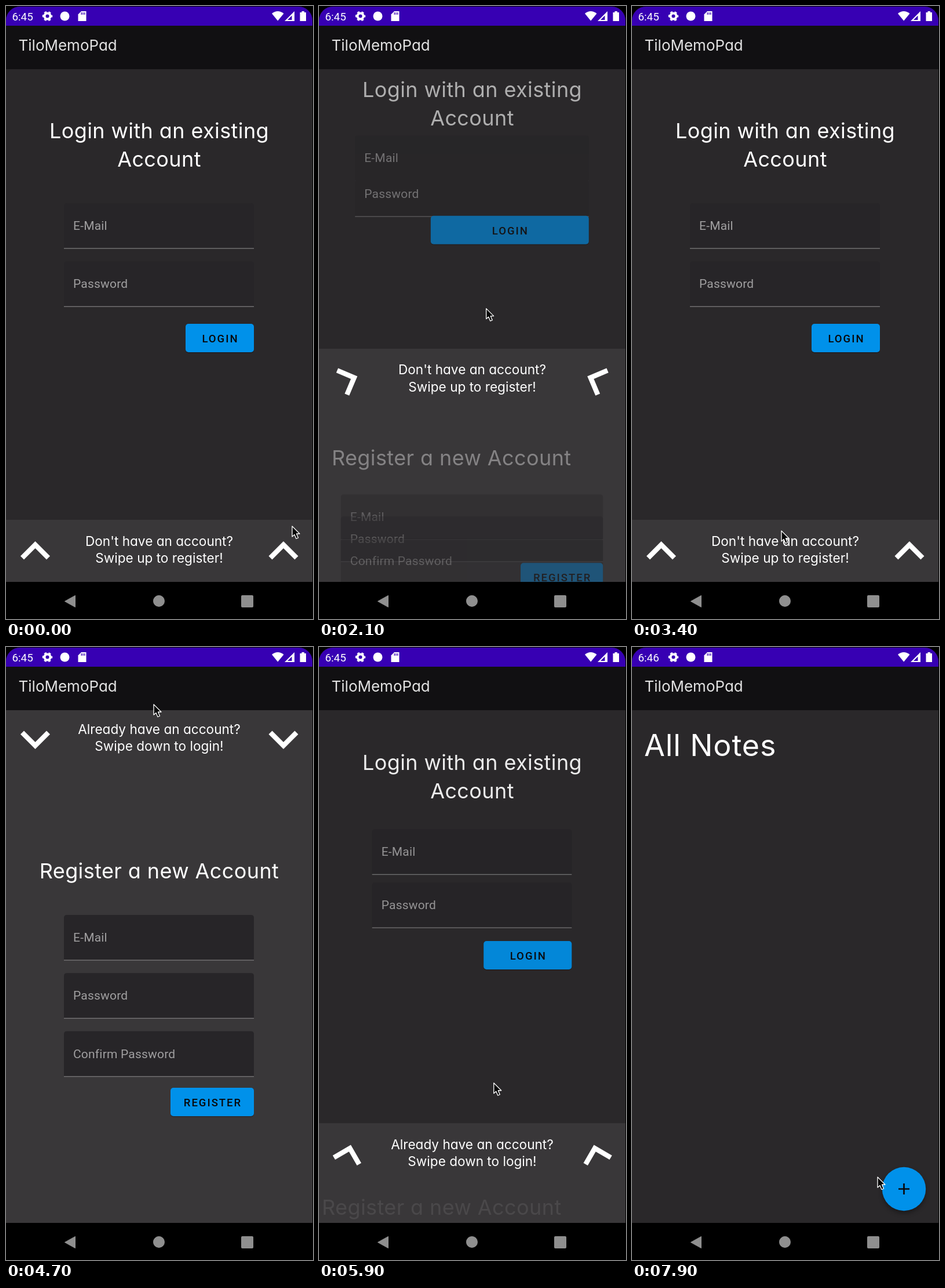
Animation, 530 px wide and 1057 px high, one loop 8 s. Source, as an HTML page:

```html
<!DOCTYPE html>
<html lang="en">
<head>
<meta charset="utf-8">
<title>TiloMemoPad</title>
<style>
html, body { margin: 0; width: 100%; height: 100%; overflow: hidden; background: #000; }
svg { display: block; width: 530px; height: 1057px; }
text { fill: #fff; font-family: Inter, sans-serif; font-optical-sizing: none; font-feature-settings: "cv11"; }
.mid { text-anchor: middle; }
.head { font-size: 36px; letter-spacing: .4px; }
.hint { font-size: 22.6px; }
.label { font: 21px Roboto, sans-serif; letter-spacing: .2px; fill: #a09fa0; }
.cap { font: 500 18.5px Roboto, sans-serif; letter-spacing: 2px; fill: #08080a; }
.clock { font: 18.8px Roboto, sans-serif; }
.box { fill: #272528; }
.line { fill: #757475; }
.btn { fill: #0091ea; }
</style>
</head>
<body>
<svg viewBox="0 0 530 1057">
  <defs>
    <clipPath id="screen"><rect y="1" width="529" height="1056" rx="24"/></clipPath>
    <clipPath id="body"><rect y="109" width="529" height="884"/></clipPath>
    <filter id="soft" x="-30%" y="-30%" width="160%" height="160%"><feGaussianBlur stdDeviation="4"/></filter>
    <path id="chevron" d="M-22.5 11.5L0-11 22.500 11.500" fill="none" stroke="#fff" stroke-width="8.5"/>
  </defs>
  <g clip-path="url(#screen)">
    <rect width="529" height="993" fill="#2a282a"/>
    <g clip-path="url(#body)">
      <g id="auth">
        <g id="login">
          <g id="loginHead" class="head mid">
            <text x="264.5" y="228">Login with an existing</text>
            <text x="264.5" y="277">Account</text>
          </g>
        </g>
        <g id="panel">
          <rect width="529" height="900" fill="#393739"/>
          <use id="chevL" href="#chevron"/>
          <use id="chevR" href="#chevron"/>
          <g class="hint mid">
            <text id="hint1" x="264.5" y="44.5"/>
            <text id="hint2" x="264.5" y="74"/>
          </g>
        </g>
        <g id="register">
          <text id="regHead" class="head mid">Register a new Account</text>
        </g>
      </g>
      <g id="notes">
        <text x="21" y="188" font-size="52" letter-spacing=".9">All Notes</text>
        <circle cx="469.5" cy="939" r="37" opacity=".4" filter="url(#soft)"/>
        <circle cx="469.5" cy="934.5" r="37.7" class="btn"/>
        <path d="M460 934.5h19M469.5 925v19" stroke="#0a0a0c" stroke-width="2.7"/>
      </g>
    </g>
    <rect y="34" width="529" height="75" fill="#111012"/>
    <text x="21.5" y="77" font-size="26" fill-opacity=".88">TiloMemoPad</text>
    <rect width="529" height="34" fill="#3700b3"/>
    <text id="clock" class="clock" x="10.5" y="24.5"/>
    <g fill="#fff">
      <g fill="none" stroke="#fff">
        <circle cx="71.5" cy="17.5" r="5" stroke-width="4"/>
        <circle cx="71.5" cy="17.5" r="7.4" stroke-width="2.6" stroke-dasharray="4 3.75" stroke-dashoffset="2"/>
      </g>
      <circle cx="101.5" cy="17.5" r="8"/>
      <path d="M130 9h8.5v17h-14V14.5Z"/>
      <path d="M459 13Q469 5 479.500 13L469.200 25.500Z"/>
      <path d="M498 9V26H481Z"/>
      <path d="M510.500 9h4.500v2h3v15h-10.500v-15h3Z"/>
    </g>
    <path d="M130.300 11v4m2.700-4v4m2.700-4v4" stroke="#3700b3" stroke-width="1.3"/>
    <path d="M493.500 16.500V24H486Z" fill="#3700b3"/>
    <rect y="993" width="530" height="64"/>
    <g fill="#8f8f8f">
      <path d="M101.500 1026.500l18-10v20Z" stroke="#8f8f8f" stroke-linejoin="round"/>
      <circle cx="264" cy="1026" r="10"/>
      <rect x="406" y="1016" width="21" height="21" rx="2"/>
    </g>
  </g>
  <path id="cursor" d="M0 0V18L4 14.500 7 21.500 10.500 20 7.500 13H13Z" fill="#050505" stroke="#fff" stroke-width="1.3" stroke-linejoin="round"/>
</svg>
<script>
const LOOP = 8000, STEP = 100, NOTES_AT = 6600;
const $ = id => document.getElementById(id);

function set(el, attrs) {
  for (const key in attrs) el.setAttribute(key, attrs[key]);
}

function make(parent, tag, attrs, text = '') {
  const el = document.createElementNS('http://www.w3.org/2000/svg', tag);
  set(el, attrs);
  el.textContent = text;
  return parent.appendChild(el);
}

const move = (el, x, y, turn = 0) =>
  el.setAttribute('transform', `translate(${x} ${y}) rotate(${turn})`);

const mix = (a, b, u) => a + (b - a) * u;

// Fields and buttons return a function that places them
function field(parent, label) {
  const g = make(parent, 'g', {});
  const box = make(g, 'path', { class: 'box' });
  const line = make(g, 'rect', { class: 'line', y: 77.3, height: 1.4 });
  make(g, 'text', { class: 'label', x: 16, y: 46 }, label);
  return (left, right, top, opacity) => {
    const w = right - left;
    set(box, { d: `M0 78V5Q0 0 5 0H${w - 5}Q${w} 0 ${w} 5V78Z` });
    set(line, { width: w });
    set(g, { opacity });
    move(g, left, top);
  };
}

function button(parent, label) {
  const g = make(parent, 'g', {});
  const shade = make(g, 'rect', { y: 1.5, height: 49, rx: 5, opacity: .25 });
  const face = make(g, 'rect', { class: 'btn', height: 49, rx: 5 });
  const text = make(g, 'text', { class: 'cap mid', y: 32 }, label);
  return (left, right, top, opacity) => {
    const w = right - left;
    set(shade, { width: w });
    set(face, { width: w });
    set(text, { x: w / 2 + 1 });
    set(g, { opacity });
    move(g, left, top);
  };
}

const loginFields = ['E-Mail', 'Password'].map(s => field($('login'), s));
const loginButton = button($('login'), 'LOGIN');
const regFields = ['E-Mail', 'Password', 'Confirm Password'].map(s => field($('register'), s));
const regButton = button($('register'), 'REGISTER');

// Eased pointer moves; a move with "open" also drags the panel to that share
const moves = [
  { from: 0, to: 400, x: 354, y: 686 },
  { from: 800, to: 1100, x: 349, y: 623 },
  { from: 1200, to: 1500, x: 300, y: 890 },
  { from: 1500, to: 2200, x: 288, y: 500, open: .4 },
  { from: 2200, to: 3300, x: 258, y: 905, open: 0 },
  { from: 3500, to: 3900, x: 256, y: 330, open: 1 },
  { from: 4300, to: 4700, x: 255, y: 99 },
  { from: 5000, to: 6094, x: 306, y: 811, open: 0 },
  { from: 6100, to: 7000, x: 490, y: 940 },
  { from: 7200, to: 7900, x: 424, y: 914 }
];

function smooth(t, from, to) {
  const u = Math.min(1, Math.max(0, (t - from) / (to - from)));
  return u * u * (3 - 2 * u);
}

function stateAt(t) {
  const s = { x: 494, y: 897, open: 0 };
  for (const { from, to, ...goal } of moves)
    for (const key in goal) s[key] = mix(s[key], goal[key], smooth(t, from, to));
  return s;
}

function drawLogin(p) {
  const left = 100 - 100 * p, right = 428 + 100 * p;
  set($('login'), { opacity: 1 - p });
  move($('loginHead'), 0, -188 * p);
  loginFields.forEach((place, i) => place(left, right, 340 + 100.3 * i - (309 + 102 * i) * p, 1));
  loginButton(310 - 310 * p, right, 548 - 493 * p, 1);
}

function drawRegister(p) {
  const right = 528 - 100 * p;
  set($('regHead'), { x: 207 + 57.5 * p, y: 1031.5 - 633 * p, opacity: p });
  regFields.forEach((place, i) => place(100 * p, right, 1073 - (611 - 100.3 * i) * p, p));
  regButton(387 - 103 * p, right, 1082 - 322 * p, p);
}

function drawPanel(p, opened) {
  move($('panel'), 0, 886 - 781 * p);
  move($('chevL'), 50.5, 54, 180 * p);
  move($('chevR'), 479, 54, -180 * p);
  $('hint1').textContent = opened ? 'Already have an account?' : "Don't have an account?";
  $('hint2').textContent = opened ? 'Swipe down to login!' : 'Swipe up to register!';
}

function draw(t) {
  const { x, y, open } = stateAt(t);
  const inNotes = t >= NOTES_AT;
  move($('cursor'), x, y);
  $('clock').textContent = inNotes ? '6:46' : '6:45';
  $('auth').style.display = inNotes ? 'none' : '';
  $('notes').style.display = inNotes ? '' : 'none';
  drawLogin(open);
  drawPanel(open, t >= 3900 && open > 0);
  drawRegister(open);
}

const start = performance.now();
function tick() {
  const t = (performance.now() - start) % LOOP;
  draw(Math.floor(t / STEP) * STEP);
  requestAnimationFrame(tick);
}
tick();
</script>
</body>
</html>
```
